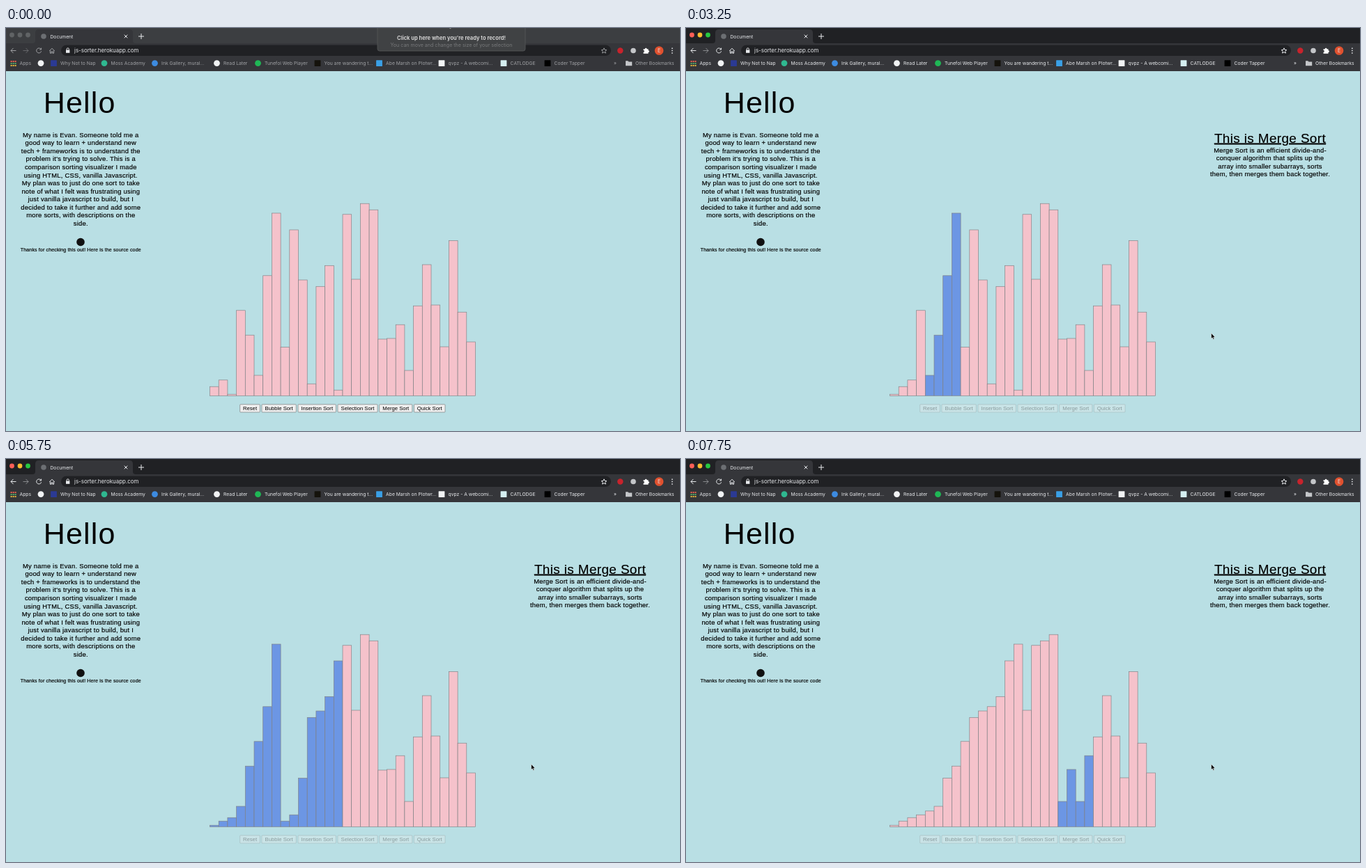
These frames come from a looping animation (967 by 579 pixels, 8000 ms). An HTML page:

```html
<!DOCTYPE html>
<html lang="en">
<head>
<meta charset="utf-8">
<title>Sorting visualizer</title>
<style>
  html, body { margin: 0; width: 100%; height: 100%; overflow: hidden; background: #b9dfe4; }
  svg { display: block; width: 967px; height: 579px; }
  text { white-space: pre; }
  .ui { font-family: Inter, sans-serif; font-size: 6.75px; fill: #e8eaed; }
  .page { font-family: "Liberation Sans", Arial, sans-serif; font-size: 9.4px; letter-spacing: .24px;
          text-anchor: middle; fill: #000; stroke: #000; stroke-width: .18; }
  .line { fill: none; stroke: #e8eaed; stroke-width: 1; }
  .strip { fill: #202124; }
  .inactive .strip { fill: #3c3e41; }
  .inactive .lights circle { fill: #606365; }
  .inactive .dim { opacity: .6; }
  #bars rect { fill: #f5c2cb; stroke: #7f7f82; stroke-width: .65; }
  #bars rect.lit { fill: #6c96e4; }
  #buttons { font: 7.7px "Liberation Sans", Arial, sans-serif; text-anchor: middle; }
  #buttons rect { fill: #efefef; stroke: #767676; stroke-width: .65; }
  #buttons.off rect { fill-opacity: .3; stroke-opacity: .35; }
  #buttons.off text { fill-opacity: .32; }
</style>
</head>
<body>
<svg viewBox="0 0 967 579">
  <g id="browser" class="ui">
    <rect class="strip" width="967" height="23"/>
    <path fill="#35363a" d="M38 22q4 0 4-4V7q0-5 5-5H177q5 0 5 5v11q0 4 4 4H967V62H0V22Z"/>
    <g class="lights">
      <circle cx="8.5" cy="10" r="3.4" fill="#ff5f57"/>
      <circle cx="20" cy="10" r="3.4" fill="#febc2e"/>
      <circle cx="31.5" cy="10" r="3.4" fill="#28c840"/>
    </g>
    <circle cx="54" cy="12" r="3.8" fill="#6c6f73"/>
    <text x="63.5" y="14.5">Document</text>
    <path class="line" d="M169.7 9.7l4.6 4.6m0-4.6l-4.6 4.6M190 12h8m-4-4v8"/>
    <rect x="79" y="24.5" width="789" height="15.5" rx="7.75" fill="#202124"/>
    <g class="dim">
      <path class="line" d="M14.5 32.5H7m3.5-3.6L7 32.5l3.5 3.6M50 30.3a3.5 3.5 0 1 0 .6 3M50.6 28.6v2.4h-2.4M62.3 33L66 29.2 69.7 33M63.4 32.4v3.8h1.8v-2.4h1.6v2.4h1.8v-3.8"/>
      <path class="line" opacity=".45" d="M24.5 32.5H32m-3.5-3.6L32 32.5l-3.5 3.6"/>
      <path class="line" d="M858 28.8l1.1 2.5 2.7.3-2 1.8.6 2.7-2.4-1.4-2.4 1.4.6-2.7-2-1.8 2.7-.3Z"/>
    </g>
    <path d="M86 31.5h5.4v4.3H86Z"/>
    <path class="line" d="M87.1 31.8v-1.4a1.6 1.6 0 0 1 3.2 0v1.4"/>
    <text x="98" y="35.3" font-size="7.95">js-sorter.herokuapp.com</text>
    <circle cx="881.3" cy="32.5" r="4.2" fill="#c8232c"/>
    <circle cx="900" cy="32.5" r="3.8" fill="#c4c6c9"/>
    <path fill="#fff" d="M914.5 30.2h2.2a1.4 1.4 0 0 1 2.8 0h2v2a1.4 1.4 0 0 1 0 2.8v1.7h-7v-2a1.3 1.3 0 0 0 0-2.6Z"/>
    <circle cx="937" cy="32.5" r="6.3" fill="#e0512f"/>
    <text x="937" y="35" text-anchor="middle" font-size="7">E</text>
    <path d="M955 28.4h1.5v1.5H955ZM955 31.8h1.5v1.5H955ZM955 35.2h1.5v1.5H955Z"/>
    <g id="bookmarks"></g>
    <path d="M889 47.3h3.4l1 1.2h4.8v5.8H889Z" fill="#c4c6c9"/>
  </g>

  <g id="overlay" class="ui" text-anchor="middle">
    <rect x="533" y="-6" width="212" height="39" rx="3" fill="#404244" stroke="#56585a" stroke-width=".8"/>
    <text x="639" y="17.4" font-size="7.6" font-weight="600" fill="#e0e0e0">Click up here when you're ready to record!</text>
    <text x="639" y="27" font-size="7.1" fill="#77797b">You can move and change the size of your selection</text>
  </g>

  <g class="page">
    <text x="105.7" y="122" font-size="43" letter-spacing="1.2" stroke="none" style="letter-spacing:1.2px">Hello</text>
    <g id="intro"></g>
    <circle cx="107" cy="307.5" r="5.8" fill="#111" stroke="none"/>
    <text x="107.3" y="321.4" font-size="7" style="letter-spacing:.15px">Thanks for checking this out! Here is the source code</text>
    <g id="about">
      <text x="838" y="164.5" font-size="18.9" text-decoration="underline" style="letter-spacing:.38px">This is Merge Sort</text>
    </g>
  </g>
  <g id="bars"></g>
  <g id="buttons"></g>
  <path id="cursor" d="M0 0V7.8L1.8 6.2 3 8.9 4.3 8.3 3.1 5.7H5.5Z" stroke="#fff" stroke-width=".5"/>
</svg>

<script>
const $ = id => document.getElementById(id);

function add(parent, tag, attrs, text = "") {
  const el = document.createElementNS("http://www.w3.org/2000/svg", tag);
  for (const key in attrs) el.setAttribute(key, attrs[key]);
  el.textContent = text;
  return parent.appendChild(el);
}

function addLines(parent, x, y, lines) {
  lines.forEach((line, i) => add(parent, "text", { x, y: y + i * 11.55 }, line));
}

addLines($("intro"), 107.3, 156.8, [
  "My name is Evan. Someone told me a", "good way to learn + understand new",
  "tech + frameworks is to understand the", "problem it's trying to solve. This is a",
  "comparison sorting visualizer I made", "using HTML, CSS, vanilla Javascript.",
  "My plan was to just do one sort to take", "note of what I felt was frustrating using",
  "just vanilla javascript to build, but I", "decided to take it further and add some",
  "more sorts, with descriptions on the", "side."]);
addLines($("about"), 838, 178.6, [
  "Merge Sort is an efficient divide-and-", "conquer algorithm that splits up the",
  "array into smaller subarrays, sorts", "them, then merges them back together."]);

// Bookmarks: icon centre, icon colour, round icon?, label
const bookmarks = [
  [50, "#f1f3f4", 1, ""], [68.5, "#2b3a94", 0, "Why Not to Nap"], [141, "#2fb890", 1, "Moss Academy"],
  [213.5, "#3d8be0", 1, "Ink Gallery, mural..."], [302.5, "#f1f3f4", 1, "Read Later"],
  [361.5, "#1fb755", 1, "Tunefol Web Player"], [447, "#15130c", 0, "You are wandering t..."],
  [535.5, "#3aa0e6", 0, "Abe Marsh on Plotwr..."], [625, "#f1f3f4", 0, "qvpz - A webcomi..."],
  [714, "#d5eef0", 0, "CATLODGE"], [777, "#000", 0, "Coder Tapper"]];
const bar = $("bookmarks");
const label = (x, text) => add(bar, "text", { x, y: 53, class: "dim" }, text);
for (const [x, fill, round, text] of bookmarks) {
  add(bar, "rect", { x: x - 4.4, y: 46.2, width: 8.8, height: 8.8, rx: round ? 4.4 : .5, fill });
  label(x + 9.6, text);
}
for (let i = 0; i < 9; i++) {
  add(bar, "rect", { x: 6.6 + i % 3 * 3, y: 47 + (i / 3 | 0) * 3, width: 2, height: 2,
    fill: ["#e9604f", "#53ab68", "#e7b63c"][(i / 3 | 0)] });
}
label(19.5, "Apps");
label(872, "»");
label(903, "Other Bookmarks");

const buttons = [["Reset", 335.7, 364.3], ["Bubble Sort", 367, 416.3], ["Insertion Sort", 419, 473.4],
  ["Selection Sort", 476, 533], ["Merge Sort", 535.7, 582.8], ["Quick Sort", 585.4, 630]];
for (const [text, left, right] of buttons) {
  add($("buttons"), "rect", { x: left, y: 540.8, width: right - left, height: 11.2, rx: .8 });
  add($("buttons"), "text", { x: (left + right) / 2, y: 549 }, text);
}

const BASE = 528.3, BAR = 12.7, STEP = 250, LOOP = 8000;
const MERGE_DELAY = 135, WRITE_DELAY = 47;
const tops = [515.2, 505.8, 526.2, 405.8, 441.2, 499, 355.8, 266, 458.6, 290, 362, 511.2, 371.3, 341.3, 520.2,
  267.8, 361, 252.2, 261.2, 447, 446, 426.2, 492, 399.2, 340, 398, 458, 305.6, 408.2, 451];
const rects = tops.map((_, i) => add($("bars"), "rect", { x: 292.5 + i * BAR, width: BAR }));

// Runs the merge sort until the clock passes the limit.
function sortUntil(limit) {
  const values = [...tops];
  let clock = 0, lit = [1, 0];
  function sort(lo, hi) {
    if (lo >= hi) return;
    const mid = (lo + hi) >> 1;
    sort(lo, mid);
    sort(mid + 1, hi);
    if (clock >= limit) return;
    lit = [lo, hi];
    clock += MERGE_DELAY;
    values.slice(lo, hi + 1).sort((a, b) => b - a).forEach((value, k) => {
      if (clock <= limit) values[lo + k] = value;
      clock += WRITE_DELAY;
    });
  }
  sort(0, values.length - 1);
  return { values, lit };
}

const clamp = v => Math.max(0, Math.min(1, v));
const mix = (a, b, k) => a + (b - a) * k;

function cursorAt(t) {
  if (t < 2500) {
    const k = clamp(t / 1000), ease = k * k * (3 - 2 * k);
    return [mix(634, 554.3, ease), mix(-8, 547, ease)];
  }
  const k = clamp((t - 2500) / 600);
  return [mix(554.3, 753.6, k), mix(547, 438.5, k)];
}

function draw(now) {
  const t = Math.floor(now % LOOP / STEP) * STEP;
  const started = t >= 2250;
  // The first merges run fast, then the pace settles.
  const { values, lit } = sortUntil(Math.min(t - 1695, (t - 2500) * 2.1));
  rects.forEach((rect, i) => {
    rect.setAttribute("y", values[i]);
    rect.setAttribute("height", BASE - values[i]);
    rect.setAttribute("class", i >= lit[0] && i <= lit[1] ? "lit" : "");
  });
  $("browser").setAttribute("class", t < 1500 ? "ui inactive" : "ui");
  $("overlay").setAttribute("opacity", clamp(1 - t / 500));
  $("buttons").setAttribute("class", started ? "off" : "");
  $("about").setAttribute("visibility", started ? "visible" : "hidden");
  $("cursor").setAttribute("transform", `translate(${cursorAt(t)})`);
  requestAnimationFrame(draw);
}
requestAnimationFrame(draw);
</script>
</body>
</html>
```
